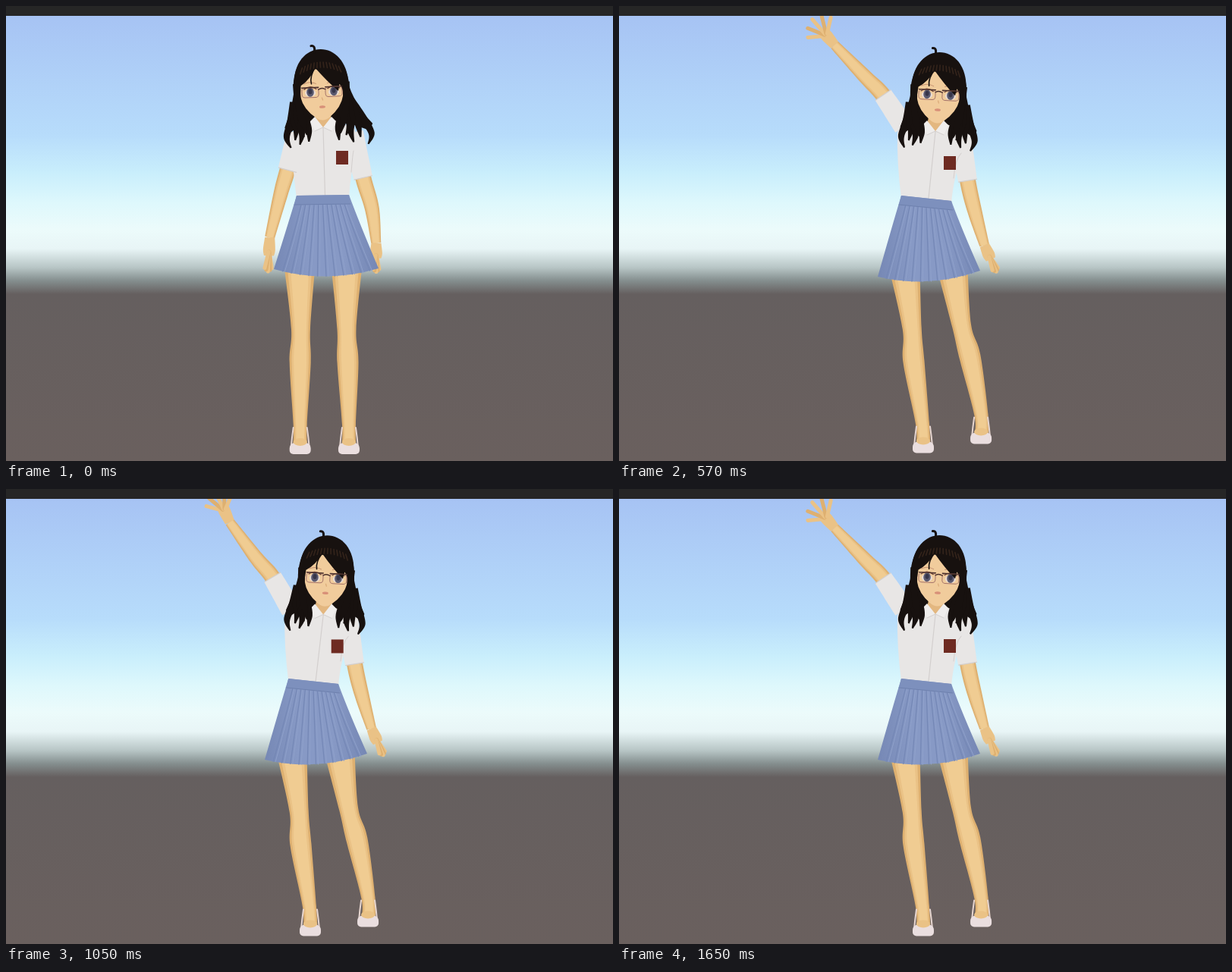
These frames come from a looping animation (800 px wide and 600 px high, 1680 ms). An HTML page with a canvas:

```html
<!DOCTYPE html>
<html lang="en">
<head>
<meta charset="utf-8">
<title>Waving student</title>
<style>
  html, body { margin: 0; width: 100%; height: 100%; overflow: hidden; background: #665f5d; }
  canvas { display: block; width: 800px; height: 600px; }
</style>
</head>
<body>
<canvas id="stage" width="800" height="600"></canvas>
<script>
const ctx = document.getElementById('stage').getContext('2d');
const LOOP = 1680, STEP = 30, RAISED = 210, WAVING = 300, HALF_WAVE = 270;
const SKIN = ['#deb070', '#eac286', '#f0cc92'];
const HAIR = '#17110f', SHIRT = '#e8e6e5', FOLD = '#d3cfce';

// Joint angles of the waving arm in degrees: upper arm, elbow, forearm, hand.
const HANG = [105, 106, 104, 93];
const REACH = [267, 259, 264, 268];
const OVER = [267, 260, 291, 360];
const OUT = [236, 226, 226, 229];

const lerp = (a, b, k) => a + (b - a) * k;
const lerpAll = (a, b, k) => a.map((v, i) => lerp(v, b[i], k));
const ease = k => (1 - Math.cos(Math.PI * k)) / 2;
const clamp = k => Math.min(1, Math.max(0, k));

// Joints reached from a point by turning and stepping along each bone.
function chain(x, y, angles, lengths) {
  const joints = [[x, y]];
  angles.forEach((degrees, i) => {
    const a = degrees * Math.PI / 180;
    joints.push([x += lengths[i] * Math.cos(a), y += lengths[i] * Math.sin(a)]);
  });
  return joints;
}

// stance runs from standing still to posing; sway from -1 (left) to 1 (right).
function poseAt(t) {
  const stance = ease(clamp(t / RAISED));
  const settle = Math.sin(clamp((t - RAISED) / (WAVING - RAISED)) * Math.PI / 2);
  const wave = t < WAVING ? 0 : ease((t - WAVING) / HALF_WAVE);
  const sway = (1.5 - .5 * settle - 2 * wave) * stance;
  const raise = lerpAll(HANG, REACH, stance);
  const wavingArm = lerpAll(lerpAll(raise, OVER, settle), OUT, wave);
  const s = stance, w = sway;
  const bones = [84, 44, 82, 30];
  return {
    spread: lerp(.2, .62 - .38 * w, s),
    head: [416 + 9 * s + 4 * w, 113 + 5 * s + w, -.05 + .105 * s],
    neck: [418 + 4 * s + 5 * w, 153 + 7 * s + 2 * w],
    badge: [443 - 4 * s + 3 * w, 200 + 9 * s + 2 * w],
    hair: [-51 - 8 * s - 11 * w, 65 - 12 * s],
    waist: [383 - 10 * s + w, 250, 452 - 14 * s, 249 + 8 * s],
    hem: [353 - 12 * s, 347 + 10 * s, 491 - 15 * s, 346 + 3 * s],
    armL: chain(384 - 6 * s + 2 * w, 168 - 7 * s + 2 * w, wavingArm, [50, 33, 59, 40]),
    armR: chain(457 - 7 * s, 167 + 5 * s + 2 * w,
      lerpAll([77, 74, 83, 90], [81, 77, 74, 66], s), [61, 42, 46, 34]),
    legL: chain(387 - 11 * s, 342, lerpAll([89, 91, 90, 90], [83, 87, 82, 88], s), bones),
    legR: chain(449 - 10 * s, 342, lerpAll([90, 88, 89, 90], [81, 75, 79, 91], s),
      bones.map(b => b * (1 - .04 * s)))
  };
}

function shape(fill, draw) {
  ctx.beginPath();
  draw();
  ctx.fillStyle = fill;
  ctx.fill();
}

function line(color, width, ...p) {
  ctx.beginPath();
  ctx.moveTo(p[0], p[1]);
  if (p.length === 6) ctx.quadraticCurveTo(p[2], p[3], p[4], p[5]);
  else ctx.lineTo(p[2], p[3]);
  ctx.strokeStyle = color;
  ctx.lineWidth = width;
  ctx.stroke();
}

function oval(fill, x, y, rx, ry) {
  shape(fill, () => ctx.ellipse(x, y, rx, ry, 0, 0, 2 * Math.PI));
}

// Continues the path with a curve through all points.
function smooth(points) {
  ctx.lineTo(...points[0]);
  for (let i = 1; i < points.length; i++) {
    const from = points[i - 1], to = points[i];
    const before = points[i - 2] || from, after = points[i + 1] || to;
    const lead = from.map((v, j) => v + (to[j] - before[j]) / 6);
    const tail = to.map((v, j) => v - (after[j] - from[j]) / 6);
    ctx.bezierCurveTo(...lead, ...tail, ...to);
  }
}

// Fills a tapering band along joints.
function band(fill, joints, widths, scale = 1) {
  const a = [], b = [];
  widths.forEach((width, i) => {
    const [x, y] = joints[i];
    const [px, py] = joints[i - 1] || joints[i], [qx, qy] = joints[i + 1] || joints[i];
    const r = width * scale / 2 / (Math.hypot(qx - px, qy - py) || 1);
    const ox = (py - qy) * r, oy = (qx - px) * r;
    a.push([x + ox, y + oy]);
    b.unshift([x - ox, y - oy]);
  });
  shape(fill, () => { smooth(a); smooth(b); });
}

function limb(joints, widths) {
  SKIN.forEach((color, i) => band(color, joints, widths, 1 - i * .2));
}

function background() {
  const sky = ctx.createLinearGradient(0, 0, 0, 600);
  [[0, '#a5c1f3'], [170, '#b7dcfb'], [220, '#c9eefc'], [260, '#def8fc'], [295, '#ecfbfb'],
   [320, '#e8f5f6'], [345, '#b7c5c5'], [362, '#858f8f'], [380, '#655f5f'], [600, '#6a605e']]
    .forEach(([y, color]) => sky.addColorStop(y / 600, color));
  ctx.fillStyle = sky;
  ctx.fillRect(0, 0, 800, 600);
}

function leg(joints) {
  limb(joints, [41, 25, 28, 18, 19]);
  const [x, y] = joints[4];
  for (const s of [-1, 1]) line('#e6d5cf', 2, x + s * 9, y - 26, x + s * 11, y - 12, x + s * 12, y);
  shape('#eadedf', () => ctx.roundRect(x - 14, y - 6, 28, 15, [7, 7, 5, 5]));
  oval(SKIN[1], x, y - 7, 9, 5);
}

function arm(joints, spread) {
  limb(joints.slice(0, 4), [20, 21, 19, 13]);
  const [[wx, wy], [tx, ty]] = joints.slice(3);
  const dx = tx - wx, dy = ty - wy, reach = Math.hypot(dx, dy);
  const at = k => [wx + dx * k, wy + dy * k], [px, py] = at(.4);
  band(SKIN[1], [at(0), at(.4), at(.6)], [13, 16, 13]);
  for (let i = -2; i <= 2; i++) {
    const angle = Math.atan2(dy, dx) + i * .47 * spread;
    const c = Math.cos(angle), s = Math.sin(angle), length = reach * (.72 - .05 * Math.abs(i));
    line(SKIN[i % 2 ? 0 : 1], 5, px + c * 3, py + s * 3, px + c * length, py + s * length);
  }
}

function skirt({ waist: [ax, ay, bx, by], hem: [lx, ly, rx, ry] }) {
  const cx = (lx + rx) / 2, cy = (ly + ry) / 2 + 20;
  const tone = ctx.createLinearGradient(lx, 0, rx, 0);
  ['#7688b5', '#8799c5', '#8799c5', '#7587b4'].forEach((color, i) => tone.addColorStop(i / 3, color));
  shape(tone, () => {
    ctx.moveTo(ax, ay);
    ctx.lineTo(bx, by);
    ctx.quadraticCurveTo(bx + 14, by + 38, rx, ry);
    ctx.quadraticCurveTo(cx, cy, lx, ly);
    ctx.quadraticCurveTo(ax - 12, ay + 40, ax, ay);
  });
  for (let k = 1 / 12; k < .99; k += 1 / 12) {
    const x = lerp(lerp(lx, cx, k), lerp(cx, rx, k), k);
    const y = lerp(lerp(ly, cy, k), lerp(cy, ry, k), k);
    const tx = lerp(ax, bx, k), ty = lerp(ay, by, k) + 13, bend = lerp(tx, x, .4);
    line('#7487b5', 1.2, tx, ty, bend, ty + 40, x, y);
    line('#8fa1cb', 1, tx + 2, ty, bend + 3, ty + 40, x + 3, y);
  }
  shape('#7d90bd', () => {
    ctx.moveTo(ax, ay);
    ctx.lineTo(bx, by);
    ctx.lineTo(bx + 2, by + 12);
    ctx.lineTo(ax - 3, ay + 12);
  });
  line('#6e81ae', 1, ax - 3, ay + 12, bx + 2, by + 12);
}

function shirt({ neck: [nx, ny], armL, armR, waist: [ax, ay, bx, by] }) {
  const [lx, ly] = armL[0], [rx, ry] = armR[0];
  shape(SHIRT, () => {
    ctx.moveTo(nx - 14, ny - 2);
    ctx.lineTo(lx - 4, ly - 6);
    ctx.lineTo(lx - 9, ly + 8);
    ctx.quadraticCurveTo(ax - 6, ay - 45, ax, ay + 4);
    ctx.lineTo(bx, by + 4);
    ctx.quadraticCurveTo(bx + 2, by - 30, rx + 7, ry + 12);
    ctx.lineTo(rx + 2, ry - 6);
    ctx.lineTo(nx + 15, ny - 2);
  });
  for (const [[x, y], [hx, hy]] of [armL, armR]) {
    band(SHIRT, [[x, y], [hx, hy]], [28, 25]);
    const k = 12 / Math.hypot(hx - x, hy - y), ox = (y - hy) * k, oy = (hx - x) * k;
    line(FOLD, 1.2, hx + ox, hy + oy, hx - ox, hy - oy);
  }
  line(FOLD, 1, bx + 3, by - 30, bx + 5, by - 55, rx + 1, ry + 24);
  line(FOLD, 1.2, nx, ny + 8, (ax + bx) / 2 + 3, (ay + by) / 2);
}

function collar({ neck: [x, y], head }) {
  const top = lerp(x, head[0], .5);
  shape('#e3b780', () => {
    ctx.moveTo(top - 10, y - 16);
    ctx.lineTo(top + 10, y - 16);
    ctx.lineTo(x + 11, y - 2);
    ctx.lineTo(x, y + 8);
    ctx.lineTo(x - 11, y - 2);
  });
  for (const s of [-1, 1]) {
    shape('#efedec', () => {
      ctx.moveTo(x + s * 11, y - 7);
      ctx.lineTo(x, y + 7);
      ctx.lineTo(x + s * 11, y + 12);
      ctx.lineTo(x + s * 17, y - 1);
    });
    line(FOLD, 1, x, y + 7, x + s * 11, y + 12);
  }
}

function inHead([x, y, tilt], draw) {
  ctx.save();
  ctx.translate(x, y);
  ctx.rotate(tilt);
  draw();
  ctx.restore();
}

// Hair falling beside the face, flaring to x = flare and ending in curled locks.
function sideHair(flare) {
  const s = Math.sign(flare);
  shape(HAIR, () => {
    ctx.moveTo(s * 32, -28);
    ctx.quadraticCurveTo(s * 37, 14, flare, 45);
    ctx.lineTo(flare - s * 4, 54);
    ctx.lineTo(s * 26, 40);
    ctx.lineTo(s * 26, -10);
  });
  for (let i = 0; i < 5; i++) {
    const k = i / 4, x = s * (38 - 8 * k);
    const tip = lerp(flare - s * 7, s * 20, k), end = 68 - 7 * k + 4 * Math.cos(i * Math.PI);
    const curl = s * 5 * Math.cos(i * 2);
    band(HAIR, [[x, 12], [lerp(x, tip, .7), 36], [tip + curl, end - 14], [tip, end]], [9, 10, 8, 2]);
  }
}

function frontLock(s) {
  band(HAIR, [[s * 33, -12], [s * 31, 20], [s * 27, 38], [s * 22, 56]], [9, 8, 9, 2]);
}

function backHair() {
  shape(HAIR, () => {
    ctx.moveTo(-36, -8);
    ctx.bezierCurveTo(-36, -72, 36, -72, 36, -8);
    ctx.lineTo(32, 40);
    ctx.lineTo(-30, 40);
  });
}

function eye(x) {
  oval('#e9dcd5', x, 1, 7, 5);
  oval('#5b5a70', x, 0, 4.8, 6);
  oval('#37364a', x, -1, 2.5, 3.5);
  line('#6b4238', 1.4, x - 8, -4, x, -10, x + 8, -4);
  line('#c4906f', 1, x - 8, -11, x, -15, x + 8, -11);
}

function face() {
  shape('#f1cc9c', () => {
    ctx.moveTo(-28, -30);
    ctx.lineTo(-28, 6);
    ctx.quadraticCurveTo(-25, 22, -9, 34);
    ctx.quadraticCurveTo(0, 41, 9, 34);
    ctx.quadraticCurveTo(25, 22, 28, 6);
    ctx.lineTo(28, -30);
  });
  eye(-15);
  eye(16);
  line('#dbab7a', 1.2, 0, 8, 1, 11);
  oval('#d89078', 0, 20, 4, 1.8);
}

function bangs() {
  shape(HAIR, () => {
    ctx.moveTo(-37, 4);
    ctx.bezierCurveTo(-41, -75, 41, -75, 37, 6);
    ctx.lineTo(29, 10);
    ctx.quadraticCurveTo(28, -4, 24, -9);
    ctx.lineTo(22, 0);
    ctx.quadraticCurveTo(8, -13, -7, -32);
    ctx.quadraticCurveTo(-14, -17, -27, -9);
    ctx.lineTo(-29, 12);
  });
  line(HAIR, 1.6, -7, -32, -15, -21, -13, -11);
  for (let i = -6; i <= 6; i++) {
    line('#34241b', 1.6, i * 4, -39 + i * i * .18, i * 4.5, -32 + i * i * .2);
  }
  line(HAIR, 3, -7, -52, -5, -62, -11, -61);
}

function glasses() {
  for (const x of [-26, 5]) {
    ctx.beginPath();
    ctx.roundRect(x, -6, 22, 13, 4);
    ctx.strokeStyle = '#a4736a';
    ctx.lineWidth = 1;
    ctx.stroke();
    line('#4a302c', 1.4, x, -6, x + 22, -6);
  }
  line('#4a302c', 1.4, -4, -3, 0, -6, 5, -3);
}

function draw(now) {
  const pose = poseAt(Math.floor(now % LOOP / STEP) * STEP);
  const { head, hair, armL, armR, spread, badge } = pose;
  const [sleeveX, sleeveY] = armL[1];
  const hairBehind = sleeveX > 360 && sleeveY < 140;
  const leftHair = () => sideHair(hair[0]);

  background();
  ctx.lineCap = ctx.lineJoin = 'round';
  inHead(head, backHair);
  if (hairBehind) inHead(head, leftHair);
  leg(pose.legL);
  leg(pose.legR);
  arm(armL, spread);
  arm(armR, .2);
  shirt(pose);
  skirt(pose);
  collar(pose);
  shape('#6e2b22', () => ctx.rect(badge[0] - 8, badge[1] - 9, 16, 18));
  inHead(head, () => {
    if (!hairBehind) leftHair();
    sideHair(hair[1]);
    face();
    frontLock(-1);
    frontLock(1);
    bangs();
    glasses();
  });
  ctx.fillStyle = '#262626';
  ctx.fillRect(0, 0, 800, 13);
  requestAnimationFrame(draw);
}
requestAnimationFrame(draw);
</script>
</body>
</html>
```
